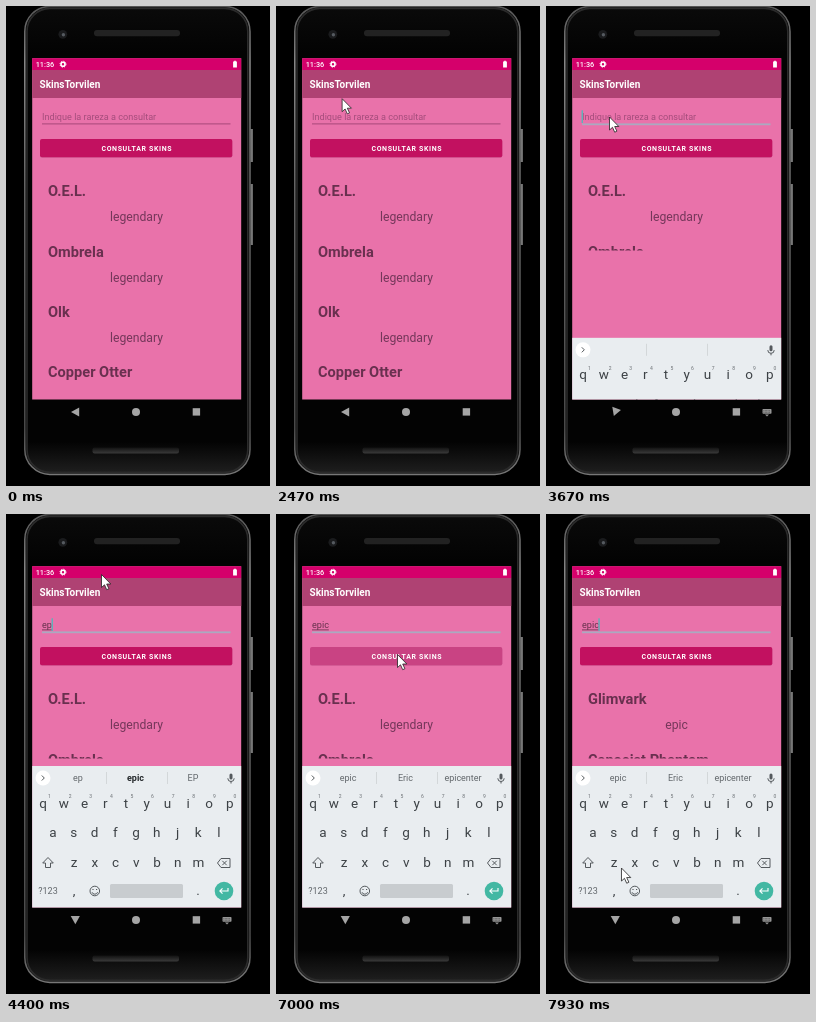
Recreate the animation shown at these times as an HTML page. Size 264x480 px, loop 8000 ms.

```html
<!DOCTYPE html>
<html lang="es">
<head>
<meta charset="utf-8">
<title>Consulta de skins</title>
<style>
html, body { margin: 0; width: 100%; height: 100%; overflow: hidden; background: #000; }
svg { display: block; width: 100vw; height: 100vh; font-family: Roboto, sans-serif; }
.mid { text-anchor: middle; }
.name { font-size: 14.6px; font-weight: 700; fill: #69304f; }
.rarity { font-size: 12.2px; fill: #74375a; text-anchor: middle; }
.field { font-size: 9.12px; }
.key { font-size: 13.5px; fill: #3c4145; text-anchor: middle; }
.digit { font-size: 5px; fill: #6a6f73; text-anchor: middle; }
.word { font-size: 9px; fill: #62676b; text-anchor: middle; }
.line { fill: none; stroke: #54595d; stroke-width: 1; }
</style>
</head>
<body>
<svg viewBox="0 0 264 480">
  <defs>
    <linearGradient id="metal" x2="0" y2="1">
      <stop offset="0" stop-color="#555"/><stop offset=".12" stop-color="#8c8c8c"/>
      <stop offset=".4" stop-color="#666"/><stop offset=".9" stop-color="#4c4c4c"/><stop offset="1" stop-color="#777"/>
    </linearGradient>
    <linearGradient id="body" x2="0" y2="1">
      <stop offset="0" stop-color="#0a0a0a"/><stop offset=".1" stop-color="#030303"/>
      <stop offset=".93" stop-color="#030303"/><stop offset="1" stop-color="#202020"/>
    </linearGradient>
    <linearGradient id="speaker" x2="0" y2="1">
      <stop offset="0" stop-color="#121212"/><stop offset="1" stop-color="#3a3a3a"/>
    </linearGradient>
    <clipPath id="screen"><rect x="26.2" y="52.2" width="209" height="341.3"/></clipPath>
    <clipPath id="listArea"><rect id="listBox" x="26" y="160" width="209" height="226"/></clipPath>
  </defs>

  <rect width="264" height="480"/>
  <path d="M245.7 123v33M245.7 178v61" stroke="#777" stroke-width="2.4"/>
  <rect x="18.8" y=".4" width="225.2" height="468" rx="25" fill="url(#body)" stroke="url(#metal)" stroke-width="1.5"/>
  <rect x="21" y="2.4" width="220.8" height="464" rx="23" fill="none" stroke="#2b2b2b" stroke-width="1.6"/>
  <rect x="88" y="24" width="86" height="6.2" rx="3" fill="#222"/>
  <rect x="86.5" y="441.5" width="86.5" height="6" rx="2" fill="url(#speaker)"/>
  <circle cx="56.8" cy="28.3" r="4.4" fill="#1a1b1d"/><circle cx="57.4" cy="28.8" r="1.7" fill="#555a60"/>

  <g clip-path="url(#screen)">
    <rect x="26" y="52" width="210" height="342" fill="#e972aa"/>
    <rect x="26" y="64" width="210" height="28" fill="#af4273"/>
    <rect x="26" y="52" width="210" height="12" fill="#d5006b"/>
    <g fill="#fff">
      <text x="29.7" y="60.8" font-size="7.3" font-weight="500">11:36</text>
      <circle cx="57" cy="58.2" r="2" fill="none" stroke="#fff" stroke-width="1.6"/>
      <circle cx="57" cy="58.2" r="3" fill="none" stroke="#fff" stroke-width="1" stroke-dasharray="1.2 1.16"/>
      <path d="M228.2 54.8h1.6v.8h1.1v5.9h-3.8v-5.9h1.1z"/>
      <text x="33.5" y="81.8" font-size="10" font-weight="700">SkinsTorvilen</text>
    </g>

    <text id="hint" class="field" x="36" y="114.3" fill="#a54d7c">Indique la rareza a consultar</text>
    <text id="typed" class="field" x="36" y="114.3" fill="#66304c"></text>
    <rect id="under" x="36" y="115.5" height=".8" fill="#66304c"/>
    <rect id="fieldLine" x="36" y="117.4" width="188.5"/>
    <rect id="caret" y="104.3" width="1.5" height="12.7" fill="#62b0b8"/>

    <rect x="34" y="134" width="192.3" height="18" rx="2" fill="#b14b80" opacity=".35"/>
    <rect id="button" x="34" y="133" width="192.3" height="18.2" rx="2"/>
    <text class="mid" x="130.8" y="145" font-size="7" font-weight="700" letter-spacing=".63" fill="#fff">CONSULTAR SKINS</text>

    <g clip-path="url(#listArea)"><g id="before"></g><g id="after"></g></g>

    <g id="keyboard">
      <rect x="26" y="252" width="210" height="143" fill="#e9edf0"/>
      <circle cx="37" cy="264" r="7.5" fill="#fff"/>
      <path class="line" d="M35.8 261.5l2.5 2.5-2.5 2.5"/>
      <path d="M100.5 258v12M161.5 258v12" stroke="#cdd1d4" stroke-width=".8"/>
      <rect x="223.5" y="259.5" width="3" height="6" rx="1.5" fill="#54595d"/>
      <path class="line" d="M221.8 264.3a3.2 3.2 0 0 0 6.4 0M225 267.5v2"/>
      <g id="words"></g>
      <g id="keys"></g>
      <path class="line" d="M42 343.5l5.3 5.5h-2.8v4.5h-5v-4.5h-2.8z"/>
      <path class="line" d="M211.5 349l3.5-4.5h9v9h-9zM216.3 346.8l4.4 4.4M220.7 346.8l-4.4 4.4"/>
      <text class="word" x="42" y="380.3">?123</text>
      <text class="key" x="68" y="381">,</text>
      <text class="key" x="192" y="381">.</text>
      <circle class="line" cx="88.8" cy="377" r="4.8"/>
      <path class="line" d="M86 378.2a2.9 2.7 0 0 0 5.6 0M86.4 375.5h1.2M90 375.5h1.2"/>
      <rect x="104" y="370" width="73" height="14" rx="1.5" fill="#c8cccf"/>
      <circle cx="218" cy="377" r="9.3" fill="#43b8a3"/>
      <path d="M222 374v3h-8M216.5 374.3l-2.7 2.7 2.7 2.7" fill="none" stroke="#fff" stroke-width="1.1"/>
    </g>
  </g>

  <g fill="#a5a5a5">
    <path id="back" d="M65 406l8.2-4.6v9.2z"/>
    <circle cx="130" cy="406" r="4"/>
    <rect x="186.7" y="402.2" width="7.4" height="7.4"/>
    <g id="imeIcon">
      <rect x="216.5" y="403" width="9" height="4.8" rx=".7"/>
      <path d="M219 408.4h4l-2 2z"/>
      <path d="M217.5 404.7h7M217.5 406.3h7" stroke="#222" stroke-width=".5" stroke-dasharray=".8 .6"/>
    </g>
  </g>
  <path id="mouse" d="M0 0v13l3-2.7 2.2 4.9 2.2-1-2.2-4.7h4.1z" fill="#fff" stroke="#222" stroke-width=".8" stroke-linejoin="round"/>
</svg>

<script>
const LOOP = 8000, STEP = 200 / 3;
const $ = id => document.getElementById(id);
const set = (id, name, value) => $(id).setAttribute(name, value);
const show = (id, on) => set(id, 'visibility', on ? 'visible' : 'hidden');
const label = (cls, x, y, s, extra = '') => `<text class="${cls}" x="${x}" y="${y}" ${extra}>${s}</text>`;
const ramp = (t, a, b) => Math.min(1, Math.max(0, (t - a) / (b - a)));
const smooth = k => k * k * (3 - 2 * k);

const list = (names, rarity) => names.map((name, i) =>
  label('name', 42, 190.2 + 60.3 * i, name) + label('rarity', 130.5, 215.2 + 60.3 * i, rarity)).join('');
$('before').innerHTML = list(['O.E.L.', 'Ombrela', 'Olk', 'Copper Otter'], 'legendary');
$('after').innerHTML = list(['Glimvark', 'Canoeist Phantom'], 'epic');

const row = (letters, x, y) => [...letters].map((c, i) => label('key', x + 20.75 * i, y, c)).join('');
$('keys').innerHTML = row('qwertyuiop', 37, 293.5) + row('asdfghjkl', 47, 323) + row('zxcvbnm', 68, 353)
  + [...'1234567890'].map((c, i) => label('digit', 43.5 + 20.6 * i, 284, c)).join('');

// [time, typed text, text end, suggestions, bold suggestion]
const typing = [
  [0, '', 36, [], -1],
  [4130, 'e', 41, ['e', 'el', 'E'], -1],
  [4330, 'ep', 46, ['ep', 'epic', 'EP'], 1],
  [4800, 'epi', 48, ['epi', 'epic', 'EPI'], 1],
  [5465, 'epic', 52.8, ['epic', 'Eric', 'epicenter'], -1]
];

// [time, x, y] of the pointer tip
const pointer = [
  [2200, 9, 286], [2333, 32, 180], [2467, 65.5, 93], [2600, 88, 82], [2800, 76, 98], [3000, 63.5, 111],
  [3800, 63.5, 111], [4067, 95.5, 60.5], [5800, 95.5, 60.5], [5933, 95, 85], [6133, 91.5, 150],
  [6333, 104, 160], [6667, 121.5, 140.5], [7600, 121.5, 140.5], [7733, 108, 215], [7867, 76, 352], [7930, 67, 387]
];

function pointerAt(t) {
  const i = pointer.findIndex(p => p[0] > t);
  if (i < 0) return pointer.at(-1).slice(1);
  const [a, b] = [pointer[i - 1], pointer[i]];
  const k = ramp(t, a[0], b[0]);
  return [a[1] + (b[1] - a[1]) * k, a[2] + (b[2] - a[2]) * k];
}

let shownWord;
function draw(time) {
  const t = Math.floor((time % LOOP + .5) / STEP) * STEP + 4;
  const focused = t >= 3270;
  const [start, text, end, words, bold] = typing.findLast(s => s[0] <= t);

  if (shownWord !== text) {
    shownWord = text;
    $('typed').textContent = text;
    $('words').innerHTML = words.map((w, i) =>
      label('word', [72, 129.5, 187][i], 267.2, w, i === bold ? 'style="font-weight:700;fill:#25292c"' : '')).join('');
  }
  show('hint', !text);
  set('under', 'width', end - 36);
  set('fieldLine', 'fill', focused ? '#aaa9c0' : '#a8487a');
  set('fieldLine', 'height', focused ? 1.8 : 1);
  set('caret', 'x', end - .5);
  show('caret', focused && Math.floor((t - (start || 3270)) / 501) % 2 === 0);

  const press = ramp(t, 6860, 7000) * (1 - ramp(t, 7330, 7530));
  set('button', 'fill', `rgb(${194 + 7 * press},${17 + 50 * press},${96 + 35 * press})`);

  const rise = smooth(ramp(t, 3560, 3800));
  show('keyboard', rise > 0);
  set('keyboard', 'transform', `translate(0 ${143 * (1 - rise)})`);
  set('listBox', 'height', rise > 0 ? 84.5 : 226);
  set('back', 'transform', `rotate(${-90 * ramp(t, 3460, 3730)} 69.3 406)`);
  set('imeIcon', 'opacity', .9 * ramp(t, 3330, 3530));

  const found = t >= 7130;
  show('before', !found);
  show('after', found);

  show('mouse', t >= 2200);
  if (t >= 2200) set('mouse', 'transform', `translate(${pointerAt(t)})`);
}

const origin = performance.now();
function tick() {
  draw(performance.now() - origin);
  requestAnimationFrame(tick);
}
tick();
</script>
</body>
</html>
```
